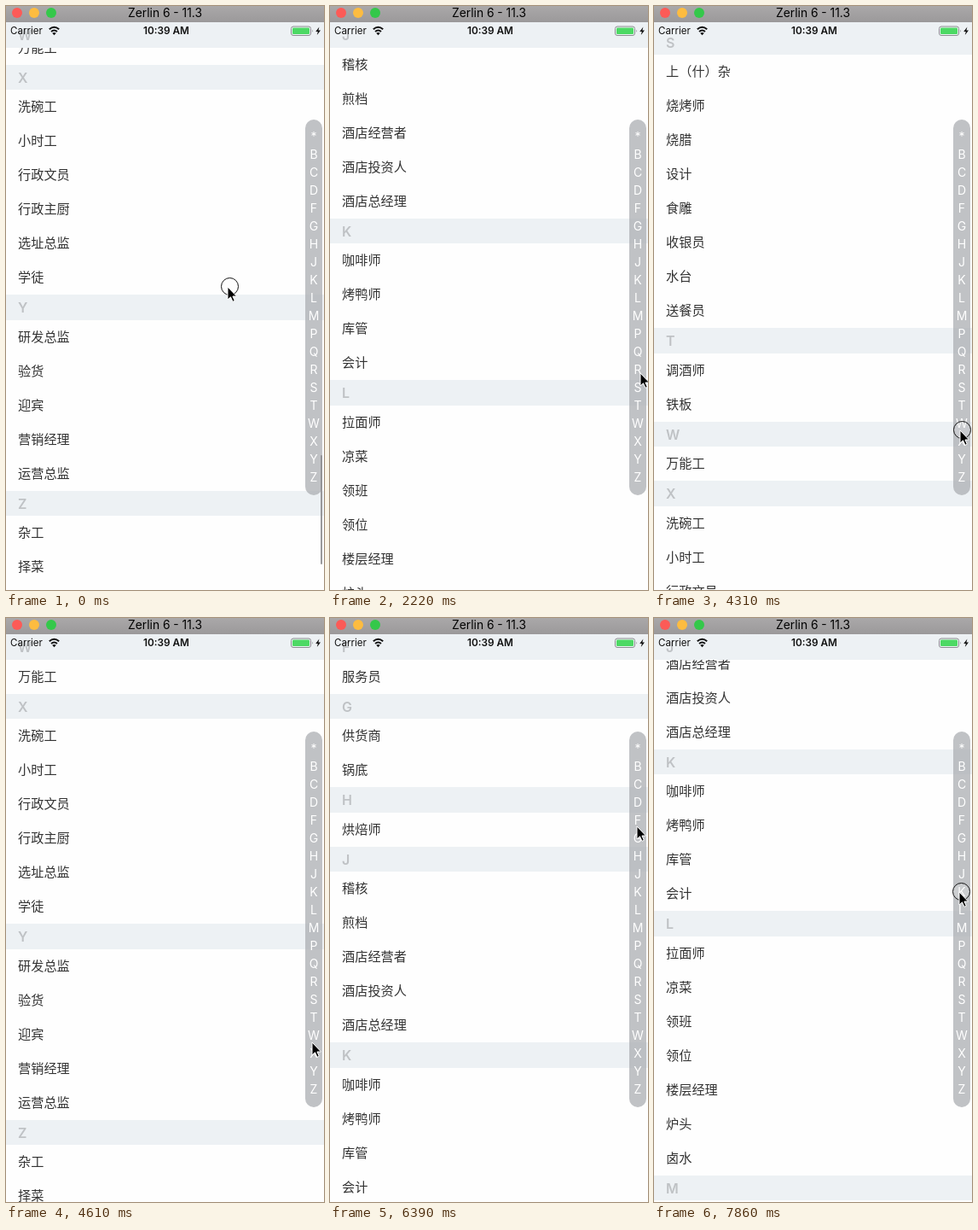
An HTML page for the animation above (8000 ms loop, 373 by 684 pixels).

```html
<!DOCTYPE html>
<html lang="zh">
<head>
<meta charset="utf-8">
<style>
  html, body { margin: 0; width: 373px; height: 684px; overflow: hidden; background: #fefefe; }
  body { position: relative; font-family: Inter, Roboto, sans-serif; }
  div, span, svg { position: absolute; white-space: nowrap; }
  #view { left: 0; top: 19px; width: 373px; height: 665px; overflow: hidden; }
  #rows { left: 0; top: 0; width: 373px; }
  .row { left: 14px; height: 40px; font: 15.2px/37px "Noto Sans CJK SC", "Noto Sans CJK", sans-serif; color: #333; }
  .head { left: 0; width: 359px; height: 29.5px; padding-left: 14px; background: #edf1f4;
          font-size: 16px; font-weight: 600; line-height: 30px; color: #bfc2c5; }
  #index { left: 351px; top: 132.5px; width: 20px; height: 440px; border-radius: 10px; background: rgba(177,179,183,.8); }
  #index span { left: 0; width: 20px; height: 20px; line-height: 20px; text-align: center; font-size: 14px; color: #fff; }
  #bar { left: 368.5px; top: 526px; width: 2.5px; height: 128px; border-radius: 2px; background: rgba(142,142,144,.9); }
  #title { left: 0; top: 0; width: 373px; height: 19px; background: linear-gradient(#aaa8a9, #9b999a);
           font-size: 13.8px; line-height: 16px; text-align: center; color: #000; }
  .light { top: 2px; width: 12px; height: 12px; border-radius: 50%; }
  .status { top: 19px; height: 21px; line-height: 21px; color: #111; }
  #over { left: 0; top: 0; }
</style>
</head>
<body>
<div id="view"><div id="rows"></div><div id="heads"></div></div>
<div id="index"></div>
<div id="bar"></div>
<div id="title">Zerlin 6 - 11.3
  <span class="light" style="left:7px;background:#fc5b57"></span>
  <span class="light" style="left:27px;background:#fdbc40"></span>
  <span class="light" style="left:47px;background:#34c84a"></span>
</div>
<span class="status" style="left:5px;font-size:11.6px">Carrier</span>
<span class="status" style="left:138px;width:100px;text-align:center;font-size:11.8px;font-weight:600">10:39 AM</span>
<svg id="over" width="373" height="684">
  <g fill="none" stroke="#111" stroke-width="2">
    <path d="M50.8 27.3Q56.5 22.3 62.2 27.3"/>
    <path d="M53 30Q56.5 27 60 30"/>
  </g>
  <path d="M54.2 31.8Q56.5 30 58.8 31.8L56.5 34.3Z" fill="#111"/>
  <rect x="334.5" y="24" width="23" height="10.5" rx="2.5" fill="none" stroke="#8b8d90"/>
  <rect x="336" y="25.5" width="20" height="7.5" rx="1.2" fill="#4cd964"/>
  <path d="M359 27.5q1.6 1.7 0 3.5Z" fill="#8b8d90"/>
  <path d="M367.4 24.5L363.2 30H365.8L364.8 34L369 28.4H366.4Z" fill="#111"/>
  <g id="pointer">
    <circle id="touch" cx="2.5" cy="-.5" r="10" fill="rgba(255,255,255,.2)" stroke="#111"/>
    <path d="M0 0V15L3.5 11.8L6 17.3L8.3 16.3L5.9 11H10.5Z" stroke="#fff"/>
  </g>
</svg>
<script>
const $ = id => document.getElementById(id);
const HEAD = 29.5, ROW = 40;
const LOOP = 8000, TICK = LOOP / 54;
const sections = `F 服务员
G 供货商 锅底
H 烘焙师
J 稽核 煎档 酒店经营者 酒店投资人 酒店总经理
K 咖啡师 烤鸭师 库管 会计
L 拉面师 凉菜 领班 领位 楼层经理 炉头 卤水
M 面点
P 刨肉师 品牌策划总监
Q 前厅经理 切配
R 人事
S 上（什）杂 烧烤师 烧腊 设计 食雕 收银员 水台 送餐员
T 调酒师 铁板
W 万能工
X 洗碗工 小时工 行政文员 行政主厨 选址总监 学徒
Y 研发总监 验货 迎宾 营销经理 运营总监
Z 杂工 择菜`.split('\n').map(line => line.split(' '));

function add(parent, tag, cls, text, top) {
  const el = document.createElement(tag);
  el.className = cls;
  el.textContent = text;
  el.style.top = top + 'px';
  return parent.appendChild(el);
}

const topOf = {};
let y = 0;
const heads = sections.map(([letter, ...names]) => {
  const top = topOf[letter] = y;
  const el = add($('heads'), 'div', 'head', letter, 0);
  y += HEAD;
  for (const name of names) {
    add($('rows'), 'div', 'row', name, y);
    y += ROW;
  }
  return { el, top, end: y };
});
[...'*BCDFGHJKLMPQRSTWXYZ'].forEach((c, i) => add($('index'), 'span', '', c, 10.5 + 21 * i));

// Taps on the index; leave, arrive and scroll are ticks
const taps = [
  { letter: 'J', leave: 0, arrive: 4, scroll: 6, x: 359, y: 298 },
  { letter: 'R', leave: 9, arrive: 15, scroll: 20, x: 364, y: 430 },
  { letter: 'W', leave: 25, arrive: 29, scroll: 29, x: 359, y: 497 },
  { letter: 'F', leave: 31, arrive: 37, scroll: 38, x: 363, y: 235 },
  { letter: 'G', leave: 42, arrive: 44, scroll: 45, x: 357, y: 252 },
  { letter: 'K', leave: 47, arrive: 51, scroll: 52, x: 358, y: 321 }
];

function smooth(u) {
  u = Math.min(1, Math.max(0, u));
  return u * u * (3 - 2 * u);
}

function stateAt(k) {
  const s = { x: 260, y: 329, offset: topOf.W + 20, pressed: k === 0 };
  for (const tap of taps) {
    const move = smooth((k - tap.leave) / (tap.arrive - tap.leave));
    s.x += (tap.x - s.x) * move;
    s.y += (tap.y - s.y) * move;
    if (k >= tap.scroll) {
      s.offset += (topOf[tap.letter] - s.offset) * smooth(.2115 + .404 * (k - tap.scroll));
    }
    // A pointer that rested first taps briefly, otherwise it presses on arrival.
    const rested = tap.scroll - tap.arrive > 1;
    const down = rested ? tap.scroll : tap.arrive;
    const up = rested ? tap.scroll : tap.scroll + 1;
    s.pressed ||= k >= down && k <= up;
  }
  return s;
}

function draw(k) {
  const s = stateAt(k);
  const offset = Math.round(s.offset * 2) / 2;
  $('rows').style.top = -offset + 'px';
  for (const { el, top, end } of heads) {
    const pinned = Math.min(0, end - offset - HEAD);
    el.style.top = Math.max(top - offset, pinned) + 'px';
  }
  $('pointer').setAttribute('transform', `translate(${Math.round(s.x)} ${Math.round(s.y)})`);
  $('touch').style.display = s.pressed ? '' : 'none';
  $('bar').style.opacity = Math.max(0, 1 - k / 2);
}

let last = -1;
function loop() {
  const t = performance.now() % LOOP;
  const k = Math.min(53, Math.floor((t + 10) / TICK));
  if (k !== last) draw(last = k);
  requestAnimationFrame(loop);
}
loop();
</script>
</body>
</html>
```
